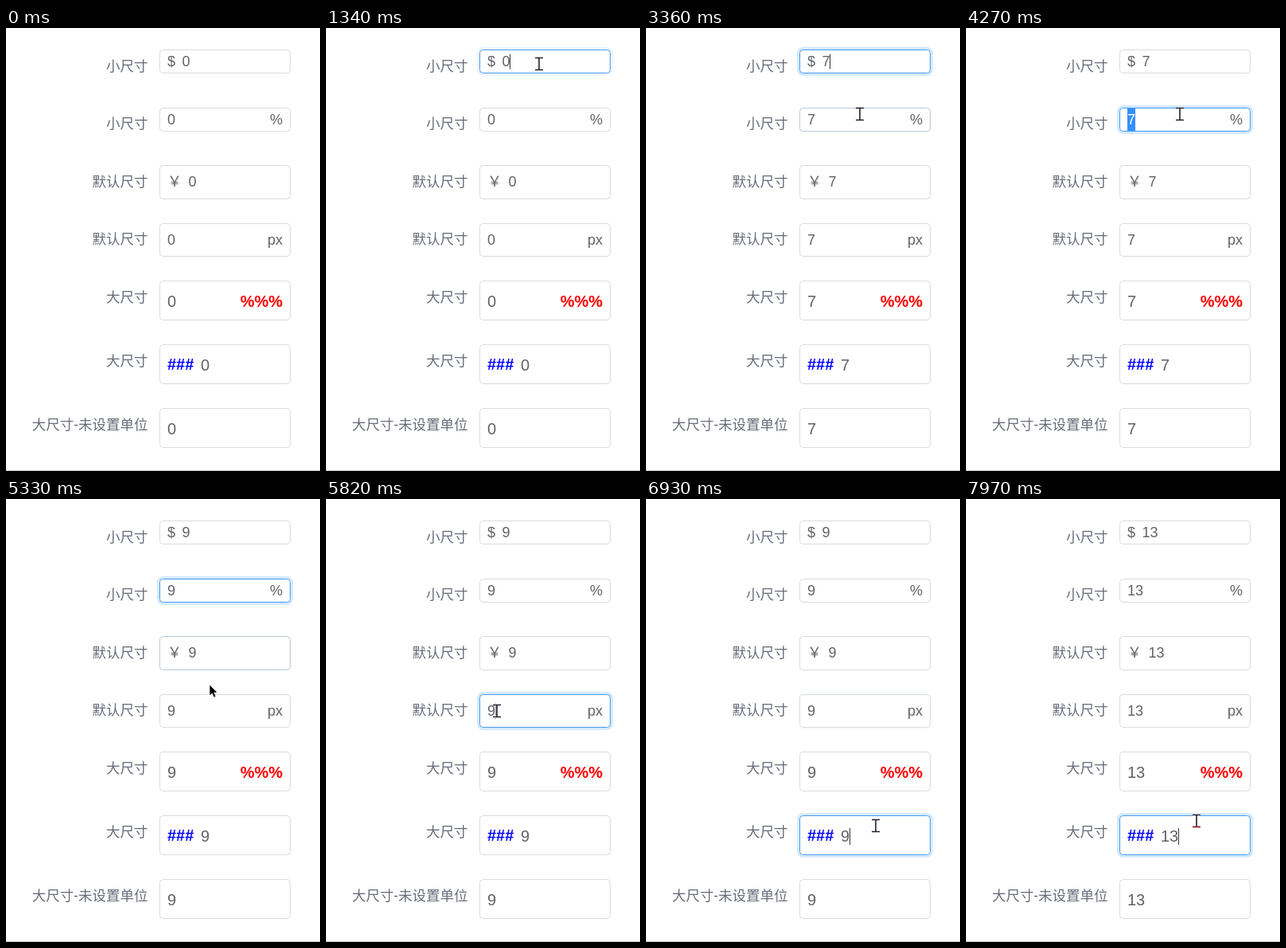
Write an HTML page that moves like this. It is 395 by 556 pixels and loops after 8000 ms.

```html
<!DOCTYPE html>
<html lang="zh">
<head>
<meta charset="utf-8">
<title>数字输入框</title>
<style>
html, body { margin: 0; width: 100%; height: 100%; overflow: hidden; background: #fff; }
svg { display: block; width: 100%; height: 100%; }
text { font-family: "Liberation Sans", "Noto Sans CJK SC", "Noto Sans CJK", sans-serif; fill: #606266; white-space: pre; }
.label { font-size: 17.5px; font-weight: 300; text-anchor: end; fill: #686c7a; }
.unit { font-size: 18px; }
.yen { font-weight: 300; }
.red { font-size: 20px; font-weight: 700; fill: #f00; }
.blue { font-size: 20px; font-weight: 700; fill: #00f; }
.end { text-anchor: end; }
.box { fill: #fff; }
.glow { fill: none; stroke: #409eff; stroke-width: 3; }
.caret { fill: #333; }
.pick { fill: #3390ff; }
.halo { fill: none; stroke: #fff; stroke-width: 3; }
.beam { fill: none; stroke: #20222e; stroke-width: 1.6; }
</style>
</head>
<body>
<svg id="stage" viewBox="0 0 395 556" preserveAspectRatio="none"></svg>
<script>
const LOOP = 8000, LEFT = 193, WIDTH = 165;
const stage = document.getElementById('stage');

// y, h: box; base: text baseline; x: start of the value
const fields = [
  { label: '小尺寸', ly: 54, y: 27, h: 30, base: 48, x: 221.5, size: 18, unit: '$', cls: 'unit' },
  { label: '小尺寸', ly: 126, y: 100, h: 30, base: 121, x: 203, size: 18, unit: '%', cls: 'unit end' },
  { label: '默认尺寸', ly: 199, y: 172, h: 43, base: 199, x: 229.5, size: 18, unit: '￥', cls: 'unit yen' },
  { label: '默认尺寸', ly: 271, y: 245, h: 42, base: 272, x: 203, size: 18, unit: 'px', cls: 'unit end' },
  { label: '大尺寸', ly: 344, y: 317, h: 50, base: 350, x: 203, size: 20, unit: '%%%', cls: 'red end', hover: '#5c9ff0' },
  { label: '大尺寸', ly: 424, y: 397, h: 50, base: 430, x: 245, size: 20, unit: '###', cls: 'blue' },
  { label: '大尺寸-未设置单位', ly: 504, y: 477, h: 50, base: 510, x: 203, size: 20 }
];

// start time and value
const counts = [[0, 0], [1610, 1], [1820, 2], [1960, 3], [2170, 4], [2520, 5],
  [2660, 6], [2800, 7], [4620, 8], [5040, 9], [7830, 12], [7970, 13]];
// field, from, to
const focuses = [[0, 1260, 3430], [1, 3430, 5500], [3, 5500, 6750], [5, 6750, 9000]];
const carets = [[0, 1340, 3430], [1, 4620, 5100], [3, 5540, 6070], [5, 6860, 7340], [5, 7830, 9000]];
const picks = [[1, 4270, 4620]];
// time, x, y of the pointer
const path = [[500, 368, 410], [650, 340, 330], [900, 290, 170], [1130, 272, 70],
  [1270, 268, 45], [1540, 268, 45], [1610, 270, 47], [2870, 270, 47], [3220, 269, 108],
  [5040, 269, 108], [5330, 256, 233], [5470, 250, 262], [5680, 88, 264], [5820, 215, 266],
  [6000, 235, 275], [6440, 274, 377], [6650, 280, 425], [6860, 288, 412], [7130, 290, 404]];
const anchors = [500, 1610, 5330, 6440, 7130];

function add(tag, attrs, parent = stage) {
  const el = document.createElementNS('http://www.w3.org/2000/svg', tag);
  for (const k in attrs) el.setAttribute(k, attrs[k]);
  parent.appendChild(el);
  return el;
}
function write(str, attrs) {
  const el = add('text', attrs);
  el.textContent = str;
  return el;
}
const clamp = v => Math.max(0, Math.min(1, v));
const active = (list, i, t) => list.some(([f, a, b]) => f === i && t >= a && t < b);
const show = (el, on) => el.setAttribute('visibility', on ? 'visible' : 'hidden');

add('rect', { width: 395, height: 556, fill: '#fff' });
add('rect', { y: 555, width: 395, height: 1, fill: '#c8c8c8' });

for (const f of fields) {
  const { y, h, base, x, size } = f;
  write(f.label, { class: 'label', x: 178.5, y: f.ly });
  f.glow = add('rect', { class: 'glow', x: LEFT - 1.5, y: y - 1.5, width: WIDTH + 3, height: h + 3, rx: 6 });
  f.box = add('rect', { class: 'box', x: LEFT + .5, y: y + .5, width: WIDTH - 1, height: h - 1, rx: 4 });
  f.pick = add('rect', { class: 'pick', x, y: y + 1, width: 10, height: h - 2 });
  if (f.unit) {
    const right = f.cls.includes('end');
    write(f.unit, { class: f.cls, x: right ? 348 : 203, y: f.cls === 'blue' ? base - 1 : base });
  }
  f.value = write('0', { x, y: base, 'font-size': size });
  f.caret = add('rect', { class: 'caret', y: base - size * .85, width: 1, height: size * 1.05 });
}

const arrow = add('path', { d: 'M0 0V14L3.2 11L5.5 16L8 15L5.8 10H10Z', fill: '#000', stroke: '#fff', 'stroke-width': .7 });
const bar = add('g', {});
const barPath = 'M-5-7.5H5M-5 7.5H5M0-7.5V7.5';
add('path', { class: 'halo', d: barPath }, bar);
add('path', { class: 'beam', d: barPath }, bar);
const foot = add('path', { d: 'M-5 7.5H5', stroke: '#b02028', 'stroke-width': 1.4 }, bar);

function pointer(t) {
  let i = path.findIndex(p => p[0] > t);
  if (i === 0) return null;
  if (i < 0) return path[path.length - 1].slice(1);
  const [t0, x0, y0] = path[i - 1], [t1, x1, y1] = path[i];
  const k = (t - t0) / (t1 - t0);
  return [Math.round(x0 + (x1 - x0) * k), Math.round(y0 + (y1 - y0) * k)];
}
const inside = (p, f) => !!p && p[0] >= LEFT && p[0] < LEFT + WIDTH && p[1] >= f.y && p[1] < f.y + f.h;

function tick(t) {
  const a = anchors.filter(v => v <= t).pop();
  return a === undefined ? t : a + Math.floor((t - a) / 70) * 70;
}

function draw(now) {
  const t = now % LOOP, q = tick(t);
  const value = String(counts.filter(c => c[0] <= t).pop()[1]);
  const pos = pointer(q), before = pointer(q - 100);

  fields.forEach((f, i) => {
    let level = 0;
    for (const [n, a, b] of focuses) {
      if (n === i) level = clamp((q - a) / 200) * (1 - clamp((q - b) / 200));
    }
    const hover = inside(pos, f) || inside(before, f);
    const color = level > .3 ? '#4a9bee' : hover ? f.hover || '#bcc5da' : '#dadbdd';
    f.box.setAttribute('stroke', color);
    f.glow.setAttribute('stroke-opacity', level * .23);

    const picked = active(picks, i, t);
    show(f.pick, picked);
    f.value.style.fill = picked ? '#fff' : '';
    f.value.textContent = value;
    show(f.caret, active(carets, i, t));
    f.caret.setAttribute('x', Math.round(f.x + value.length * f.size * .556 - .5));
  });

  const text = fields.some(f => inside(pos, f));
  show(arrow, pos && !text);
  show(bar, pos && text);
  foot.setAttribute('stroke-opacity', t >= 7130 ? 1 : 0);
  if (pos) {
    const move = `translate(${pos[0]} ${pos[1]})`;
    arrow.setAttribute('transform', move);
    bar.setAttribute('transform', move);
  }
}

const start = performance.now();
function loop() {
  draw(performance.now() - start);
  requestAnimationFrame(loop);
}
loop();
</script>
</body>
</html>
```
